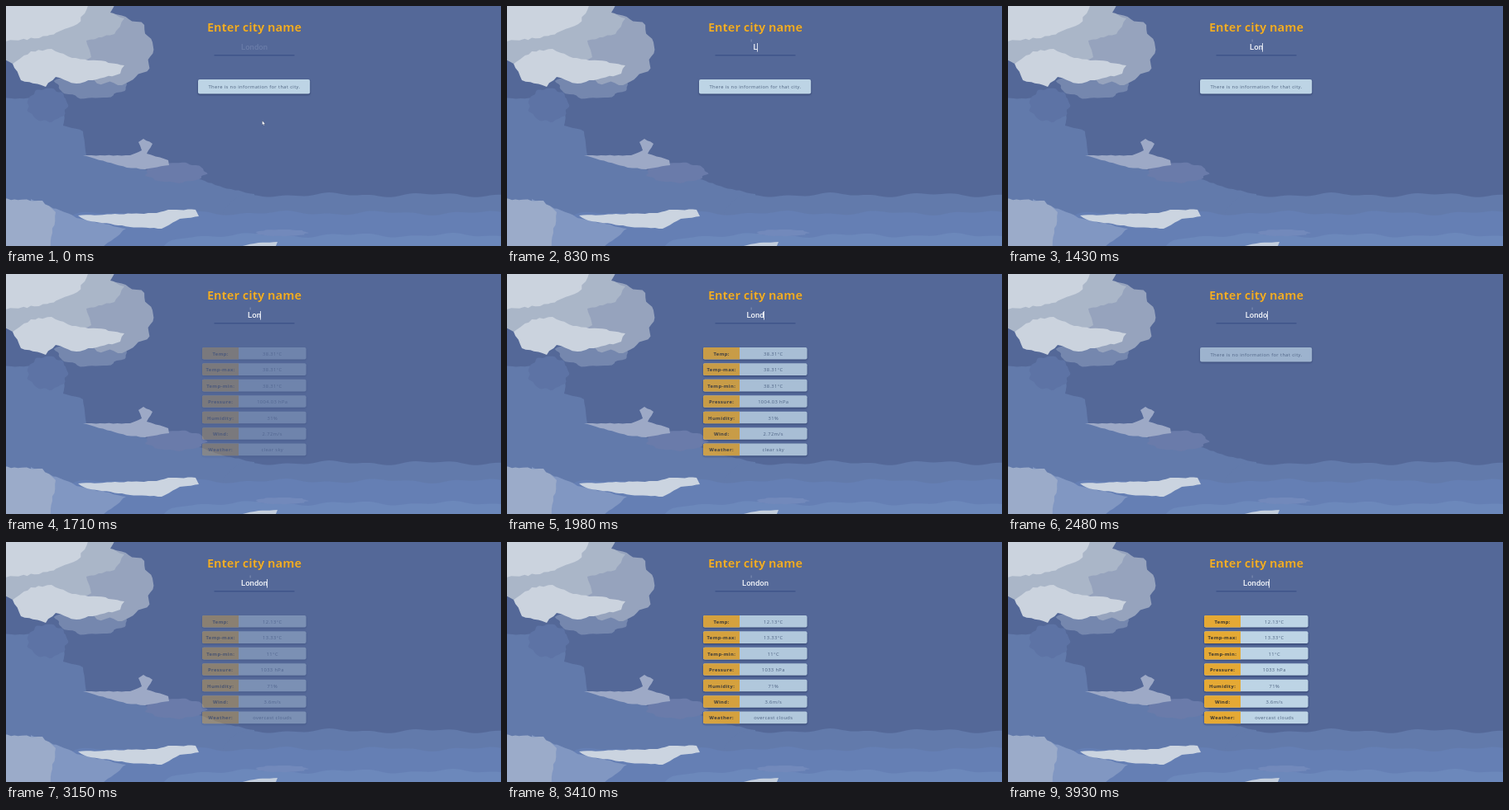
Write an HTML page that moves like this. It is 598 px wide and 291 px high and loops after 3980 ms.

```html
<!DOCTYPE html>
<html lang="en">
<head>
<meta charset="utf-8">
<title>City weather</title>
<style>
  html, body { margin: 0; width: 100%; height: 100%; overflow: hidden; background: #546898; }
  svg { display: block; width: 598px; height: 291px; }
  text { font-family: "Open Sans", "Noto Sans", sans-serif; text-anchor: middle; }
  .title { font-size: 14.5px; font-weight: 700; fill: #eeae2e; filter: drop-shadow(.8px .9px .2px rgba(40, 45, 72, .85)); }
  .field { font-family: Roboto, "Liberation Sans", sans-serif; font-size: 9.5px; font-weight: 500; }
  .info { font-size: 5.8px; letter-spacing: .37px; fill: #4d627f; }
  .label { font-size: 5.8px; letter-spacing: .4px; font-weight: 700; fill: #37342f; }
  .card { filter: drop-shadow(0 1.4px 1.1px rgba(32, 48, 92, .8)); }
</style>
</head>
<body>
<svg id="stage" viewBox="0 0 598 291"></svg>
<script>
const LOOP = 3980, FADE = 500, BLINK = 530;
const stage = document.getElementById("stage");
const clamp = v => Math.max(0, Math.min(1, v));

function add(parent, tag, attrs, text) {
  const el = document.createElementNS("http://www.w3.org/2000/svg", tag);
  for (const key in attrs) el.setAttribute(key, attrs[key]);
  if (text !== undefined) el.textContent = text;
  parent.appendChild(el);
  return el;
}

let seed = 7;
function jitter(size) {
  seed = (seed * 16807) % 2147483647;
  return (seed / 2147483647 - .5) * 2 * size;
}

function shape(fill, pts) {
  add(stage, "path", { d: "M" + pts.map(p => p.map(v => v.toFixed(1)).join(" ")).join("L") + "Z", fill });
}

// Key points joined by slightly ragged edges.
function ragged(fill, outline, rough = 1) {
  const keys = outline.split(" ").map(p => p.split(",").map(Number));
  const pts = keys.flatMap((p, i) => {
    const q = keys[(i + 1) % keys.length];
    const n = Math.max(1, Math.round(Math.hypot(q[0] - p[0], q[1] - p[1]) / 5));
    return Array.from({ length: n }, (_, k) =>
      p.map((v, a) => v + (q[a] - v) * k / n + (k ? jitter(rough) : 0)));
  });
  shape(fill, pts);
}

// Lumpy ellipse.
function puff(fill, cx, cy, rx, ry) {
  const n = 60, phase = jitter(3);
  shape(fill, Array.from({ length: n }, (_, i) => {
    const a = i / n * Math.PI * 2;
    const r = 1 + .05 * Math.sin(a * 9 + phase) + .03 * Math.sin(a * 14);
    return [cx + rx * r * Math.cos(a), cy + ry * r * Math.sin(a)];
  }));
}

// Low layer of haze with a wavy top that rises out of the left end.
function haze(fill, left, top) {
  const pts = [[610, 300], [left, 300]];
  for (let x = left; x <= 610; x += 5) {
    const rise = 25 * Math.exp((left - x) / 12);
    pts.push([x, top + rise + 1.8 * Math.sin(x / 19 + top) + 1.2 * Math.sin(x / 8)]);
  }
  shape(fill, pts);
}

function drawSky() {
  add(stage, "rect", { width: 598, height: 291, fill: "#546898" });
  ragged("#627aab", "-9,112 72,112 69,145 93,152 97,181 170,199 240,212 272,222 300,228 300,300 -9,300");
  puff("#5d73a5", 50, 120, 24, 20);
  haze("#627aab", 260, 229);
  haze("#657fb4", 60, 251);
  haze("#6c88bb", 185, 278);
  puff("#6a7baa", 205, 202, 36, 12);
  puff("#7289bb", 333, 275, 31, 4);

  puff("#7587ae", 104, 93, 43, 19);
  puff("#96a3bd", 130, 53, 47, 42);
  ragged("#aab6c8", "-9,-9 137,-9 126,8 143,15 131,34 97,42 103,62 80,70 30,63 8,70 -9,60");
  ragged("#cbd3de", "-9,-9 103,-5 86,22 66,30 40,39 -9,44", 1.5);
  ragged("#cbd3de", "8,70 30,55 55,52 80,63 110,66 143,72 138,82 105,90 85,94 60,86 48,98 18,90");

  ragged("#9da9c6", "93,181 150,181 164,175 160,165 166,161 177,167 170,179 196,187 197,193 168,198 146,196", .5);
  ragged("#8197c2", "30,234 66,248 90,258 145,270 108,300 30,300");
  ragged("#9babc9", "-9,234 44,236 60,250 52,300 -9,300");
  ragged("#cbd4e0", "87,254 182,251 196,247 229,247 233,255 210,258 188,270 150,268 98,260", .5);
  ragged("#c3cedd", "280,292 305,287 328,286 326,291", .3);
}

function card(parent, x, y, width, height) {
  add(parent, "rect", { x, y, width, height, rx: 2, fill: "#bdd4e5", class: "card" });
}

function messagePanel() {
  const g = add(stage, "g", {});
  card(g, 232, 89, 135.2, 17.5);
  add(g, "text", { x: 300, y: 100.4, class: "info" }, "There is no information for that city.");
  return g;
}

const LABELS = ["Temp", "Temp-max", "Temp-min", "Pressure", "Humidity", "Wind", "Weather"];

function tablePanel(values) {
  const g = add(stage, "g", {});
  LABELS.forEach((label, i) => {
    const y = 88.9 + i * 19.45;
    card(g, 237, y, 125.6, 14.6);
    add(g, "path", { d: `M281 ${y}h-42a2 2 0 0 0-2 2v10.6a2 2 0 0 0 2 2h42Z`, fill: "#e5a934" });
    add(g, "text", { x: 259.2, y: y + 9.8, class: "label" }, label + ":");
    add(g, "text", { x: 321.8, y: y + 9.8, class: "info" }, values[i]);
  });
  return g;
}

drawSky();
add(stage, "text", { x: 300, y: 31.2, class: "title" }, "Enter city name");
add(stage, "rect", { x: 251.5, y: 59, width: 97, height: 1.5, fill: "#3f548a" });
const field = add(stage, "text", { x: 300, y: 53.4, class: "field" });
const caret = add(stage, "rect", { y: 45, width: 1, height: 10.5, fill: "#e8ecf4" });

const panels = {
  message: messagePanel(),
  hot: tablePanel(["38.31°C", "38.31°C", "38.31°C", "1004.03 hPa", "31%", "2.72m/s", "clear sky"]),
  mild: tablePanel(["12.13°C", "13.33°C", "11°C", "1033 hPa", "71%", "3.6m/s", "overcast clouds"])
};

const arrow = add(stage, "path", { d: "M0 0V5.3L1.3 4.2L2.1 6L2.9 5.6L2.1 3.9H3.6Z", fill: "#fff", stroke: "#2b3350", "stroke-width": .3 });
const beam = add(stage, "path", { d: "M-1 0H1M0 0V6.5M-1 6.5H1", fill: "none", stroke: "#dfe5f0", "stroke-width": .6 });
const speck = add(stage, "rect", { x: 294.7, y: 40.5, width: .8, height: 3, fill: "#cfd7e6" });

const CITY = "London", FOCUS = 540;
const keys = [830, 1110, 1430, 1930, 2440, 2870];

// Each reply clears the old panel, then fades in its own.
const replies = [
  { clear: -FADE, show: -FADE, panel: "message" },
  { clear: 1545, show: 1580, panel: "hot" },
  { clear: 2035, show: 2130, panel: "message" },
  { clear: 2625, show: 2740, panel: "message" },
  { clear: 2925, show: 2965, panel: "mild" }
];

function showField(t) {
  const typed = keys.filter(k => t >= k).length;
  const text = typed ? CITY.slice(0, typed) : CITY;
  if (field.textContent !== text) field.textContent = text;
  field.setAttribute("fill", typed ? "#f4f6fa" : "#6a7ca8");
  const since = t - (typed ? keys[typed - 1] : FOCUS);
  const on = since >= 0 && Math.floor(since / BLINK) % 2 === 0;
  caret.setAttribute("opacity", on ? .9 : 0);
  const half = typed ? field.getComputedTextLength() / 2 : 0;
  caret.setAttribute("x", Math.floor(300 + half));
}

function showReply(t) {
  const { show, panel } = replies.filter(r => t >= r.clear).pop();
  for (const name in panels) {
    panels[name].setAttribute("opacity", name === panel ? clamp((t - show) / FADE) : 0);
  }
}

function showPointer(t) {
  const p = clamp((t - 30) / 520);
  const e = p * p * (3 - 2 * p);
  const x = 309.5 - 14.5 * e - 8 * Math.sin(Math.PI * e * e);
  const y = 139 - 99.5 * e;
  for (const el of [arrow, beam]) el.setAttribute("transform", `translate(${x} ${y})`);
  arrow.setAttribute("opacity", y > 60 ? 1 : 0);
  beam.setAttribute("opacity", y <= 60 && t < 610 ? 1 : 0);
  speck.setAttribute("opacity", t >= 610 ? .45 : 0);
}

function draw() {
  const t = performance.now() % LOOP;
  showField(t);
  showReply(t);
  showPointer(t);
  requestAnimationFrame(draw);
}
draw();
</script>
</body>
</html>
```
